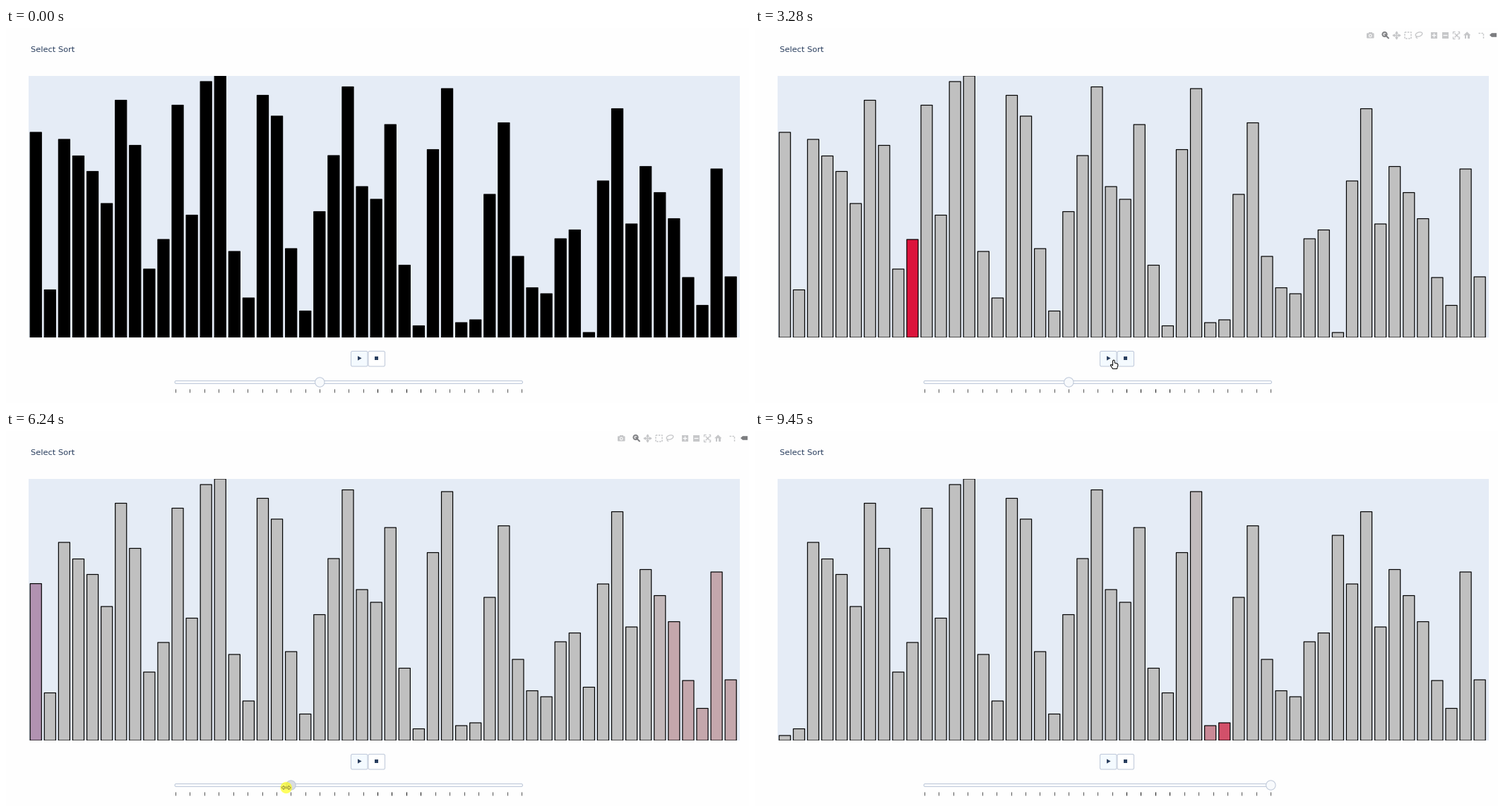
Write a matplotlib script that moves like this. It is 1052 px wide and 532 px high and loops after 9530 ms.

```python
import numpy as np
import matplotlib.pyplot as plt
from matplotlib.animation import FuncAnimation
from matplotlib.collections import PolyCollection
from matplotlib.patches import Circle, FancyBboxPatch, Polygon, Rectangle

W, H, LOOP, FRAMES = 1052, 532, 9530, 238
STEP = LOOP / FRAMES
PX = 0.72
INK, EDGE, TINT, PALE = "#2a3f5f", "#bec8d9", "#f4faff", "#f8fafc"
GREY, CRIMSON, PURPLE = (np.array(c) / 255 for c in
                         ((192, 192, 192), (220, 20, 60), (128, 0, 128)))

# the values being sorted, as bar heights
HEIGHTS = np.array([
    291, 67.5, 281, 257.5, 235.5, 190, 336.5, 272.5, 97, 139, 329.5, 173.5, 363,
    371, 122, 56, 343.5, 314, 126, 37.5, 178.5, 258, 355.5, 214, 196, 302, 102.5,
    16.5, 266.5, 353, 21, 25, 203, 304.5, 115, 70.5, 62, 140, 152.5, 7, 222, 324.5,
    161, 242.5, 205.5, 168.5, 85, 45.5, 239, 86])
N = len(HEIGHTS)
BASE, PITCH = 439, 20.08
LEFT = 34.2 + PITCH * np.arange(N)
RIGHT = LEFT + 0.8 * PITCH

fig = plt.figure(figsize=(W / 100, H / 100), dpi=100, facecolor="#fefefe")
ax = fig.add_axes([0, 0, 1, 1])
ax.set(xlim=(0, W), ylim=(H, 0))
ax.axis("off")


def box(x, y, w, h, fc, ec="none", r=0, z=1):
    if r:
        p = FancyBboxPatch((x, y), w, h, boxstyle=f"round,pad=0,rounding_size={r}")
    else:
        p = Rectangle((x, y), w, h)
    p.set(facecolor=fc, edgecolor=ec, linewidth=PX, zorder=z)
    return ax.add_patch(p)


def poly(pts, fc, ec="none", z=1):
    return ax.add_patch(Polygon(pts, closed=True, fc=fc, ec=ec, lw=PX, zorder=z))


def disc(x, y, r, fc, ec="none", lw=1, z=1, **kw):
    return ax.add_patch(Circle((x, y), r, fc=fc, ec=ec, lw=lw * PX, zorder=z, **kw))


def line(xs, ys, color, lw=1.3, z=1, **kw):
    return ax.plot(xs, ys, color=color, lw=lw * PX, zorder=z,
                   solid_capstyle="butt", **kw)[0]


def mark(x, y, shape, size, color, z=1):
    return ax.plot([x], [y], shape, ms=size * PX, color=color, mew=1.3 * PX, zorder=z)[0]


# layout
TICK0, TICK, RAIL_Y = 240, 20.43, 502.5
ax.text(35, 34.5, "Select Sort", family="DejaVu Sans", size=11.4 * PX,
        color=INK, va="baseline")
plot_area = box(32, 67.5, 1006.5, BASE - 67.5, "#e5ecf6")
box(488.5, 458.5, 23.5, 21.5, TINT, EDGE, r=2)
stop = box(513, 458.5, 23.5, 21.5, "white", EDGE, r=2)
poly([(498, 465.3), (498, 471.7), (503.6, 468.5)], INK, z=2)
box(522, 466, 5, 5, INK, z=2)
box(TICK0 - 1, RAIL_Y - 2, 492.5, 4, PALE, EDGE, r=2)
for i in range(25):
    line([TICK0 + i * TICK] * 2, [512, 517], "#111" if 14 <= i <= 17 else "#555", 1)
knob = disc(0, RAIL_Y, 6.7, PALE, EDGE, z=3)

bars = PolyCollection([], edgecolors="black", linewidths=1.2 * PX, zorder=2)
bars.set_snap(False)
ax.add_collection(bars)
bars.set_clip_path(plot_area)


def toolbar():
    c, dark, y = "#c6c7c9", "#7c7d80", 10
    a = np.linspace(0, 2 * np.pi, 30)
    camera = [box(866, 7.3, 10.5, 7.2, c, r=1), box(869, 5.8, 4.5, 2, c),
              disc(871.2, 10.9, 1.8, c, "white", z=2)]
    lens = [disc(891.5, 9, 3.2, "#d8d8da", dark, 1.7),
            line([894, 897.5], [11.5, 15], dark, 2), mark(891.5, 9, "+", 3, dark, 2)]
    pan = [mark(908.2, y, "+", 8, c)]
    pan += [mark(908.2 + 4 * np.cos(q), y + 4 * np.sin(q), s, 3, c)
            for q, s in zip(np.arange(4) * np.pi / 2, ">v<^")]
    select = [line([919.5, 928.5, 928.5, 919.5, 919.5], [5.5, 5.5, 14.5, 14.5, 5.5],
                   c, 1.5, dashes=(1.6, 1))]
    lasso = [line(940 + 4.8 * np.cos(a), 9 + 3 * np.sin(a) - np.cos(a), c),
             line([937, 936, 938], [11.5, 13.3, 14.8], c)]
    zoom = [box(x - 4.5, y - 4.5, 9, 9, c) for x in (961, 977)]
    zoom += [mark(961, y, "+", 6, "white", 2), mark(977, y, "_", 6, "white", 2)]
    fit = [mark(992.5, y, "x", 6, c)]
    fit += [line([992.5 + 2 * i, 992.5 + 4.8 * i, 992.5 + 4.8 * i],
                 [y + 4.8 * j, y + 4.8 * j, y + 2 * j], c) for i in (-1, 1) for j in (-1, 1)]
    home = [poly([(1003, 10.3), (1008.2, 5.3), (1013.4, 10.3)], c),
            box(1004.6, 10, 2.6, 4.5, c), box(1009.2, 10, 2.6, 4.5, c)]
    hover = [line([1023.5, 1031, 1031], [7.3, 7.3, 14.5], c, 1.4, dashes=(1.8, 1)),
             poly([(1040, y), (1043, 7.2), (1050, 7.2), (1050, 12.8), (1043, 12.8)], dark)]
    return camera + lens + pan + select + lasso + zoom + fit + home + hover


tools = toolbar()

# pointer shapes, relative to the hotspot
HAND = np.array([(-1.5, 8), (-1.5, 1), (0, 0), (1.2, 1), (1.2, 4), (5.4, 5.4),
                 (6, 7), (4.5, 12.5), (-1.5, 12.5), (-4.8, 7.2), (-3.6, 6.4)])
ARROW = np.array([(0, 0), (0, 12), (2.7, 9.5), (4.6, 13.4), (6.3, 12.6),
                  (4.5, 8.8), (8.2, 8.6)])
HALF = np.array([(-6.5, 0), (-3.3, -2.8), (-3.3, -.9)])
RESIZE = np.vstack([HALF, HALF[::-1] * (-1, 1), HALF * (-1, -1), HALF[::-1] * (1, -1)])
halo = disc(0, 0, 8.2, "#ffff00", z=8, alpha=0.62)
pointer = poly(HAND, "white", "black", z=9)

# pointer moves: start, end, destination
ENTRY, PLAY, STOP = np.array((690, 492)), (508, 471), (525, 471)
MOVES = [(70, 780, PLAY), (2100, 2300, STOP), (2830, 3150, PLAY),
         (3500, 4000, (444, 506)), (4150, 5100, (648, 506)), (5350, 6780, (238, 506)),
         (7270, 7647, (738, 506)), (8350, 8900, (762, 540))]
DRAG = (4060, 8000)
CLICKS = [(t, t + 90) for t in (1160, 2470, 3430)]


def ramp(t, a, b):
    return min(max((t - a) / (b - a), 0), 1)


def during(t, *spans):
    return any(a <= t < b for a, b in spans)


def pointer_at(t):
    p = ENTRY
    for a, b, goal in MOVES:
        p = p + ramp(t, a, b) * (np.array(goal) - p)
    return p


def selection_sort(values, passes):
    """One entry per step: the compared bar, or -1 for a swap."""
    v, steps, swaps = values.copy(), [], []
    for i in range(passes):
        steps += range(i + 1, N)
        m = i + np.argmin(v[i:])
        v[i], v[m] = v[m], v[i]
        swaps.append((len(steps), i, m))
        steps.append(-1)
    return np.array(steps), swaps


# pace of the sort: time, step reached
PACE = np.array([(1160, 0), (2315, 5), (3450, 9), (4260, 12), (4585, 17), (5320, 30),
                 (6165, 49), (6450, 50), (6870, 59), (7270, 60), (7588, 70),
                 (8200, 90), (8480, 98), (8700, 99), (9418, 127), (LOOP, 128)])
LAST = PACE[-1, 1]
STEPS, SWAPS = selection_sort(HEIGHTS, 3)
STEPS = STEPS[:LAST]
WHEN = np.interp(np.arange(LAST + 1), PACE[:, 1], PACE[:, 0])


def glow(t):
    """Share of the recent past that each bar spent being compared."""
    span = 300 if during(t, (PACE[3, 0], DRAG[1])) else 80
    share = np.minimum(WHEN[1:], t) - np.maximum(WHEN[:-1], t - span)
    level = np.zeros(N + 1)
    np.add.at(level, STEPS, np.clip(share, 0, None) / span)
    return level[:N, None]


def draw_bars(t):
    h = HEIGHTS.copy()
    fill = GREY + glow(t) * (CRIMSON - GREY)
    for step, a, b in SWAPS:
        if step >= LAST:
            break
        t0 = WHEN[step]
        u = ramp(t, t0, t0 + 255)
        h[a], h[b] = h[a] + u * (h[b] - h[a]), h[b] + u * (h[a] - h[b])
        fill[a] += u * (1 - ramp(t, t0 + 335, t0 + 515)) * (PURPLE - fill[a])
    if t < PACE[0, 0]:
        fill[:] = 0
    bars.set_verts([[(l, BASE), (l, BASE - k), (r, BASE - k), (r, BASE)]
                    for l, r, k in zip(LEFT, RIGHT, h)])
    bars.set_facecolor(np.clip(fill, 0, 1))


def draw_pointer(t):
    p, drag = pointer_at(t), during(t, DRAG)
    shape = ARROW
    if during(t, (720, 3560)):
        shape = HAND
    elif during(t, (3960, 8420)):
        shape = RESIZE
    pointer.set_xy(shape + p)
    pointer.set_facecolor("#fbf760" if drag else "white")
    pointer.set_edgecolor("#8d8838" if drag else "black")
    pointer.set_linewidth((0.8 if drag else 1) * PX)
    pointer.set_visible(during(t, (70, 8900)))
    halo.center = p
    halo.set_visible(drag or during(t, *CLICKS))

    # the knob snaps to ticks just behind the pointer
    tick = 10
    if t > DRAG[0]:
        tick = min(max(round((pointer_at(min(t, DRAG[1]) - 25)[0] - TICK0) / TICK), 0), 24)
    knob.center = TICK0 + tick * TICK, RAIL_Y
    knob.set_facecolor("#d9dce1" if drag else PALE)


def update(k):
    t = (k + 0.5) * STEP
    draw_bars(t)
    draw_pointer(t)
    stop.set_facecolor(TINT if during(t, (2220, 3430)) else "white")
    shown = during(t, (150, 8900))
    for part in tools:
        part.set_visible(shown)
    return [bars, pointer, halo, knob, stop, *tools]


anim = FuncAnimation(fig, update, frames=FRAMES, interval=STEP, repeat=True,
                     repeat_delay=0, blit=False)
plt.show()
```
